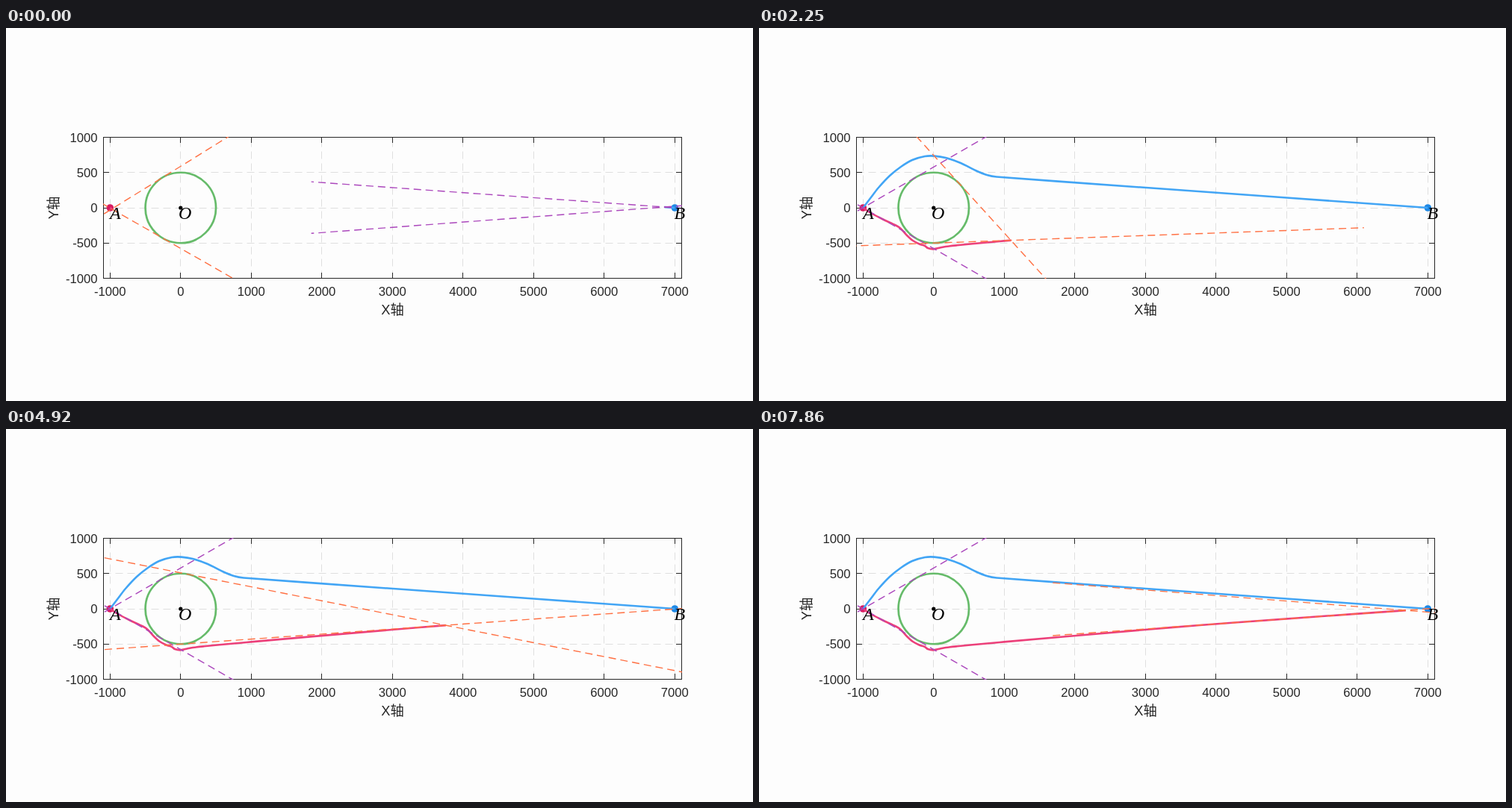
Write an HTML page that moves like this. It is 1000x500 px and loops after 7.89 s.

```html
<!DOCTYPE html>
<html lang="zh">
<head>
<meta charset="utf-8">
<title>Tangent paths</title>
<style>
  html, body { margin: 0; width: 100%; height: 100%; overflow: hidden; background: #fdfdfd; }
  svg { display: block; width: 100%; height: 100%; }
  line, path, circle, rect { fill: none; }
  text { fill: #262626; font: 16.67px "Liberation Sans", Arial, sans-serif; }
  .title { font: 300 18.3px "Liberation Sans", "Noto Sans CJK SC", "Noto Sans CJK", sans-serif; text-anchor: middle; }
  .point { fill: #000; font: italic 24px "Liberation Serif", serif; }
  .grid { stroke: #dfdfdf; stroke-dasharray: 10 6; }
  .axis { stroke: #262626; }
  .trail { stroke-width: 2.6; stroke-linejoin: round; }
  .tangent { stroke-width: 1.4; stroke-dasharray: 10 6; }
</style>
</head>
<body>
<svg id="stage" viewBox="0 0 1000 500">
  <clipPath id="plot"><rect x="130" y="146" width="775" height="190"/></clipPath>
</svg>
<script>
const FRAME_MS = 30, FRAMES = 263;
const SCALE = 0.0945, RADIUS = 500 * SCALE, REACH = 5000 * SCALE;
const LEFT = 130.5, RIGHT = 904.5, TOP = 146.5, BOTTOM = 335.5;
const toX = u => 233.8 + u * SCALE;
const toY = v => 241 - v * SCALE;
const crisp = n => Math.floor(n) + 0.5;
const stage = document.getElementById('stage');

function add(tag, attrs, parent = stage, text = '') {
  const node = document.createElementNS('http://www.w3.org/2000/svg', tag);
  for (const key in attrs) node.setAttribute(key, attrs[key]);
  node.textContent = text;
  return parent.appendChild(node);
}
const addLine = (cls, x1, y1, x2, y2) => add('line', { class: cls, x1, y1, x2, y2 });
const addText = (x, y, text, attrs = {}) => add('text', { x, y, ...attrs }, stage, text);

function drawAxes() {
  const xs = Array.from({ length: 9 }, (_, i) => (i - 1) * 1000);
  const ys = [-1000, -500, 0, 500, 1000];
  for (const u of xs) addLine('grid', crisp(toX(u)), BOTTOM, crisp(toX(u)), TOP);
  for (const v of ys) addLine('grid', LEFT, crisp(toY(v)), RIGHT, crisp(toY(v)));
  add('rect', { class: 'axis', x: LEFT, y: TOP, width: RIGHT - LEFT, height: BOTTOM - TOP });
  for (const u of xs) {
    const x = crisp(toX(u));
    addLine('axis', x, BOTTOM, x, BOTTOM - 7.5);
    addLine('axis', x, TOP, x, TOP + 7.5);
    addText(toX(u), 359, u, { 'text-anchor': 'middle' });
  }
  for (const v of ys) {
    const y = crisp(toY(v));
    addLine('axis', LEFT, y, LEFT + 7.5, y);
    addLine('axis', RIGHT, y, RIGHT - 7.5, y);
    addText(122.5, toY(v) + 6, v, { 'text-anchor': 'end' });
  }
  addText(517.5, 384, 'X轴', { class: 'title' });
  addText(0, 0, 'Y轴', { class: 'title', transform: 'translate(70 241) rotate(-90)' });
}

// Smooth curve through points; each handle is a third of its segment.
function smoothPath(points) {
  const heading = points.map((_, i) => {
    const a = points[Math.max(i - 1, 0)], b = points[Math.min(i + 1, points.length - 1)];
    const size = Math.hypot(b[0] - a[0], b[1] - a[1]);
    return [(b[0] - a[0]) / size, (b[1] - a[1]) / size];
  });
  let d = `M${points[0]}`;
  for (let i = 1; i < points.length; i++) {
    const [a, b, ha, hb] = [points[i - 1], points[i], heading[i - 1], heading[i]];
    const h = Math.hypot(b[0] - a[0], b[1] - a[1]) / 3;
    d += `C${a[0] + ha[0] * h},${a[1] + ha[1] * h} ${b[0] - hb[0] * h},${b[1] - hb[1] * h} ${b}`;
  }
  return d;
}

drawAxes();
const center = { x: toX(0), y: toY(0) };
const pointA = [toX(-1000), toY(0)], pointB = [toX(7000), toY(0)];
const plot = add('g', { 'clip-path': 'url(#plot)' });
add('circle', { cx: center.x, cy: center.y, r: RADIUS, stroke: '#66bb6a', 'stroke-width': 2.7 }, plot);
const dot = ([cx, cy], r, fill) => add('circle', { cx, cy, r, style: `fill:${fill}` }, stage);
dot(pointA, 4.8, '#d81b60');
dot(pointB, 4.8, '#1e88e5');
dot([center.x, center.y], 2.6, '#000');

const trails = add('g', { 'clip-path': 'url(#plot)' });
const tangents = add('g', { 'clip-path': 'url(#plot)' });

function makeRunner(points, speed, trailColor, tangentColor, direction) {
  const trail = add('path', { class: 'trail', stroke: trailColor, d: smoothPath(points) }, trails);
  const lines = [-1, 1].map(side =>
    ({ side, node: add('line', { class: 'tangent', stroke: tangentColor }, tangents) }));
  const total = trail.getTotalLength();
  return frame => {
    const run = Math.min((frame + 1) * speed * SCALE, total);
    trail.setAttribute('stroke-dasharray', `${run} 2000`);
    const p = trail.getPointAtLength(run);
    const dx = center.x - p.x, dy = center.y - p.y;
    const spread = Math.asin(Math.min(1, RADIUS / Math.hypot(dx, dy)));
    for (const { side, node } of lines) {
      const slope = Math.tan(Math.atan2(dy, dx) + side * spread);
      const reach = Math.min(REACH, 400 / Math.abs(slope)) * direction;
      node.setAttribute('x1', p.x - reach);
      node.setAttribute('y1', p.y - reach * slope);
      node.setAttribute('x2', p.x + reach);
      node.setAttribute('y2', p.y + reach * slope);
    }
  };
}

const runners = [
  makeRunner([pointB, [318, 199.5], [305, 197], [290, 191], [270, 181], [250, 174], [235, 171.6],
    [222, 172], [205, 177], [190, 186], [175, 198], [160, 214], [150, 227], pointA],
    150, '#42a5f5', '#ab47bc', -1),
  makeRunner([pointA, [148, 247], [165, 256], [184, 265], [190, 269.2], [198, 278], [206, 285],
    [215, 289.7], [222, 292], [226, 295], [233, 296.4], [240, 295], [250, 293], [265, 291.3],
    [328, 285.4], [590, 263], pointB],
    30, '#ec407a', '#ff7043', 1)
];

addText(139, 256, 'A', { class: 'point' });
addText(231, 256, 'O', { class: 'point' });
addText(894.5, 256, 'B', { class: 'point' });

function render() {
  const frame = Math.floor(performance.now() / FRAME_MS) % FRAMES;
  for (const run of runners) run(frame);
  requestAnimationFrame(render);
}
render();
</script>
</body>
</html>
```
